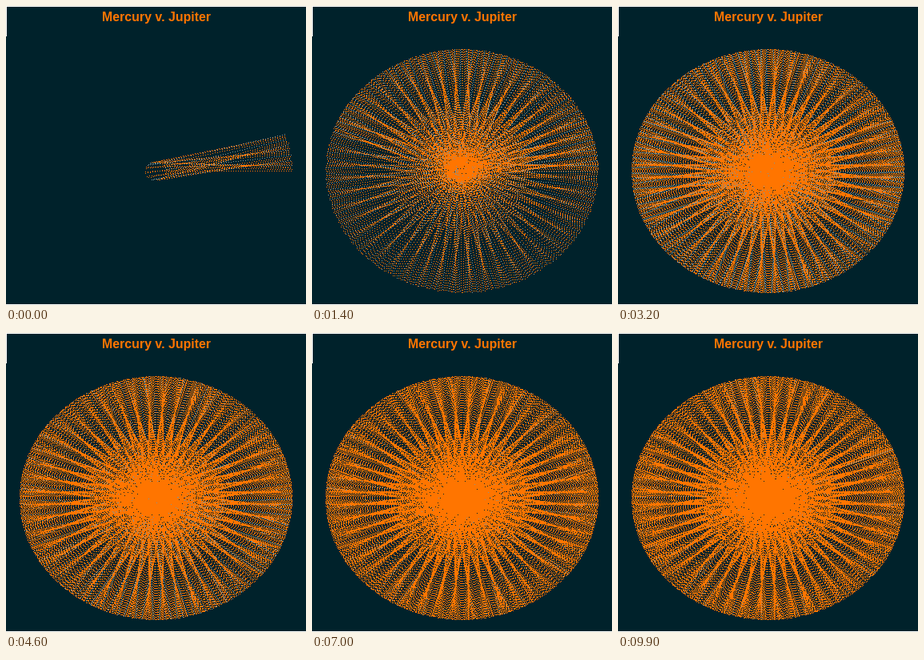
Recreate the animation shown at these times as a matplotlib script. Size 375 px wide and 374 px high, loop 10000 ms.

```python
import numpy as np
import matplotlib.pyplot as plt
from matplotlib.animation import FuncAnimation

W, H, DPI = 375, 374, 100
FRAMES, INTERVAL = 100, 100
BG, ORANGE, GREY = (0, 34, 43), (255, 117, 0), (128, 150, 152)

CX, CY = 187, 206
JUPITER = (170, 152)
MERCURY = (13, 11.5)
RATIO = 49                 # Mercury orbits per Jupiter orbit
STEP = np.radians(0.629)   # Jupiter's advance between two lines
FIRST, PER_FRAME = 29, 57.2
DOT_GAP = 3                # one pixel on, two off


def planet(radii, angle):
    return CX + radii[0] * np.cos(angle), CY - radii[1] * np.sin(angle)


def dotted(i):
    """Pixels of the i-th dotted line from Mercury to Jupiter."""
    x0, y0 = planet(MERCURY, i * STEP * RATIO)
    x1, y1 = planet(JUPITER, i * STEP)
    n = int(round(max(abs(x1 - x0), abs(y1 - y0))))
    t = np.arange(0, n + 1, DOT_GAP) / n
    x = np.rint(x0 + (x1 - x0) * t).astype(int)
    y = np.rint(y0 + (y1 - y0) * t).astype(int)
    return y, x


def line_count(frame):
    return int(FIRST + PER_FRAME * frame)


# Number of the first line that lights each pixel, per colour
NEVER = 10 ** 6
born = np.full((2, H, W), NEVER)
for i in range(line_count(FRAMES)):
    layer = born[int(i % 4 == 0 and i > 0)]
    y, x = dotted(i)
    layer[y, x] = np.minimum(layer[y, x], i)


def canvas(frame):
    n = line_count(frame)
    img = np.empty((H, W, 3), np.uint8)
    img[:] = BG
    img[born[1] < n] = GREY
    img[born[0] < n] = ORANGE
    img[[0, -1]] = 255
    img[:38, 0] = 255
    return img


fig = plt.figure(figsize=(W / DPI, H / DPI), dpi=DPI)
ax = fig.add_axes([0, 0, 1, 1])
ax.axis("off")
picture = ax.imshow(canvas(0), interpolation="nearest", aspect="auto")
ax.text(CX, 18.5, "Mercury v. Jupiter", color=np.array(ORANGE) / 255,
        family="Liberation Sans", weight="bold", size=11.4,
        ha="center", va="baseline")


def update(frame):
    picture.set_data(canvas(frame))
    return [picture]


anim = FuncAnimation(fig, update, frames=FRAMES, interval=INTERVAL, repeat=True)
plt.show()
```
